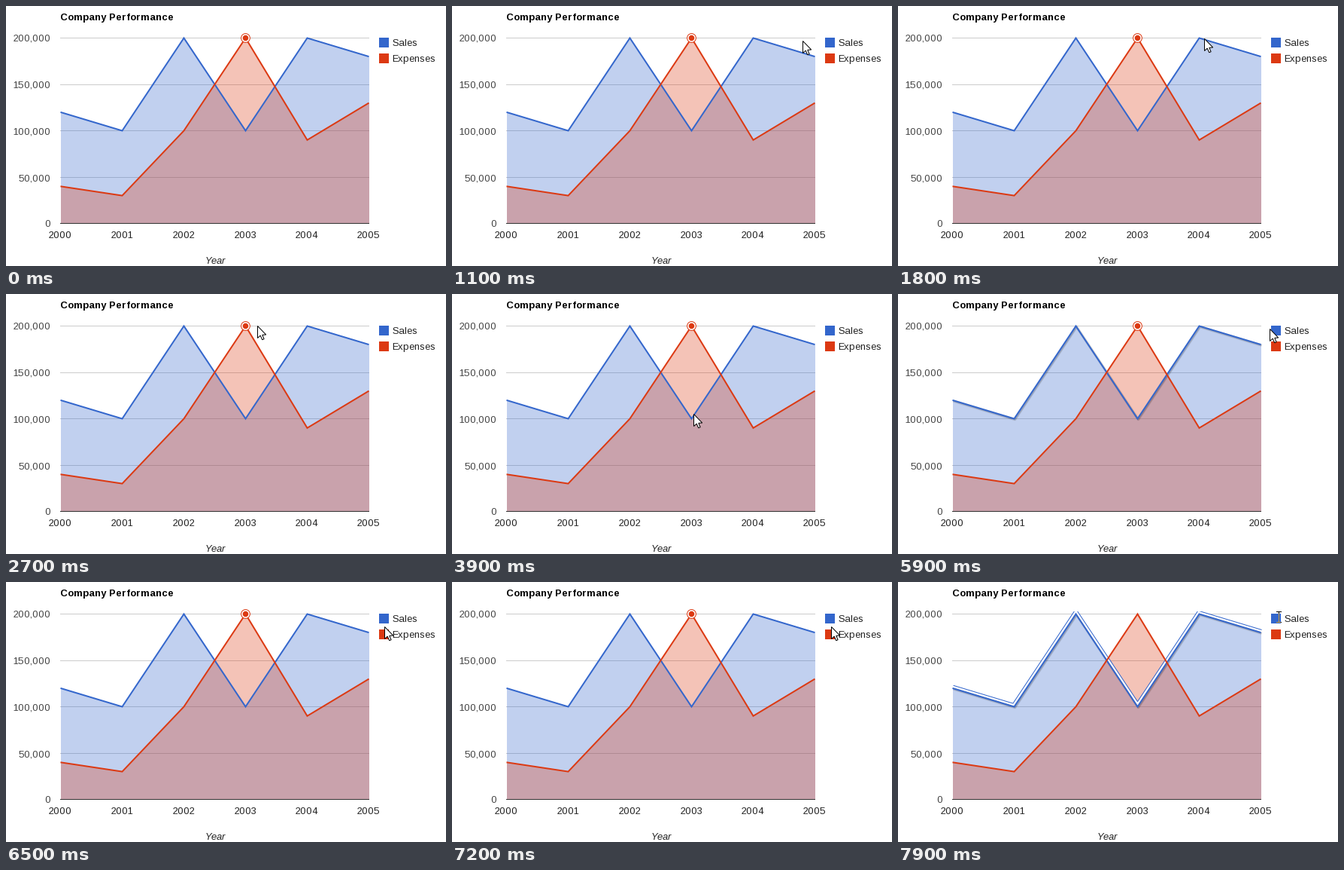
These frames come from a looping animation (585x345 px, 8000 ms). A matplotlib script:

```python
import numpy as np
import matplotlib.pyplot as plt
from matplotlib.animation import FuncAnimation
from matplotlib.patches import Circle, Polygon, Rectangle

# Whole-pixel hinting, as on a screen chart
plt.rcParams.update({"text.hinting_factor": 1, "text.kerning_factor": 6})

W, H, DPI = 585, 345, 72
STEP, FRAMES = 100, 80
LEFT, RIGHT, TOP, BASE = 72.5, 482.5, 42.5, 288.5
BLUE, RED = "#3366cc", "#dc3912"

SERIES = [
    # name, colour, values in thousands, tooltip width
    ("Sales", BLUE, [120, 100, 200, 100, 200, 180], 101),
    ("Expenses", RED, [40, 30, 100, 200, 90, 130], 126),
]

# Pointer moves: start and end in seconds, then where it stops
ENTRY = np.array([556, 54])
MOVES = [
    (0.5, 1.1, (466, 47)), (1.1, 1.5, (422, 46)), (1.6, 2.0, (402, 44)),
    (2.3, 2.7, (334, 43)), (2.7, 3.1, (319, 43)), (3.5, 3.9, (321, 160)),
    (3.9, 4.1, (319, 160)), (5.0, 5.3, (470, 52)), (5.3, 5.5, (561, 52)),
    (5.6, 5.9, (494, 47)), (5.9, 6.5, (503, 60)), (6.6, 6.9, (503, 73)),
    (7.0, 7.2, (504, 60)), (7.2, 7.6, (506, 46)),
]
ENTER, CLICK = 0.5, 7.9
HIT = 5.8

fig = plt.figure(figsize=(W / DPI, H / DPI), dpi=DPI, facecolor="white")
ax = fig.add_axes([0, 0, 1, 1])
ax.set_xlim(0, W)
ax.set_ylim(H, 0)
ax.axis("off")
plot_clip = Rectangle((72, 39), 412, 251, transform=ax.transData)


def label(x, y, text, color="#222222", **kw):
    return ax.text(x, y, text, color=color, fontsize=13.3,
                   family="Liberation Sans", va="baseline", **kw)


def stroke(pts, color, width, z, join="miter", **kw):
    line, = ax.plot(*np.transpose(pts), color=color, lw=width, zorder=z,
                    solid_joinstyle=join, solid_capstyle="butt", snap=False,
                    **kw)
    return line


def raised(pts, d):
    """Parallel polyline at distance d above pts, with mitred corners."""
    seg = np.diff(pts, axis=0)
    n = np.column_stack([seg[:, 1], -seg[:, 0]])
    n /= np.hypot(n[:, 0], n[:, 1])[:, None]
    a, b = np.vstack([n[:1], n]), np.vstack([n, n[-1:]])
    return pts + d * (a + b) / (1 + (a * b).sum(axis=1))[:, None]


def disc(center, r, z, **kw):
    return ax.add_patch(Circle(center, r, zorder=z, **kw))


def show(artists, on):
    for artist in artists:
        artist.set_visible(bool(on))


# Grid, axis and labels
for k in range(5):
    y = np.floor(BASE - k * (BASE - TOP) / 4)
    color, z = ("#cccccc", 1) if k else ("#333333", 6)
    stroke([(72, y + 0.5), (483, y + 0.5)], color, 1, z)
    label(59.3, y + 5, f"{k * 50000:,}", "#444444", ha="right")
xs = np.linspace(LEFT, RIGHT, 6)
for i, x in enumerate(xs):
    label(x, 308, str(2000 + i), ha="center")
label(72, 19, "Company Performance", "black", weight="bold")
label(278, 342, "Year", style="italic", ha="center")

# Series
points, shadows, swatches, outline = [], [], [], []
for i, (name, color, values, _) in enumerate(SERIES):
    pts = np.column_stack([xs, BASE - np.array(values) * (BASE - TOP) / 200])
    points.append(pts)
    ax.fill_between(xs, pts[:, 1], BASE, color=color, alpha=0.3, lw=0,
                    zorder=2 + i * 0.1)
    z = 4 + i * 0.5
    stroke(pts, color, 2, z + 0.3).set_clip_path(plot_clip)
    shadows.append([stroke(pts + 1, "black", w, z, "round", alpha=0.12)
                    for w in (2, 3.5)])
    row = 42 + 21 * i
    swatches.append(ax.add_patch(
        Rectangle((496, row), 13, 13, fc=color, lw=0, zorder=3)))
    label(513.5, row + 11, name)

for d, color, width in ((2.2, "white", 2.6), (3.8, BLUE, 1)):
    line = stroke(raised(points[0], d), color, width, 4.2)
    line.set_clip_path(plot_clip)
    outline.append(line)

# Selected point and hover marks
peak = points[1][3]
ring = [disc(peak, 5.9, 7, fc="white", ec=RED, lw=1),
        disc(peak, 3.8, 7.1, fc=RED, lw=0)]
peak_glow = disc(peak, 7.5, 6.9, fc="none", ec=RED, lw=2, alpha=0.3)
dot = disc((0, 0), 4, 7, fc=BLUE, lw=0)
dot_glow = disc((0, 0), 5.2, 7, fc="none", ec=BLUE, lw=2.4, alpha=0.3)

# Tooltip
tip_shade = ax.add_patch(Polygon(np.eye(3, 2), fc="black", lw=0, alpha=0.12,
                                 zorder=8))
tip_box = ax.add_patch(Polygon(np.eye(3, 2), fc="white", ec="#cccccc", lw=1,
                               zorder=8.1))
tip_text = label(0, 0, "", "black", weight="bold", ha="center", zorder=8.2)
tooltip = [tip_shade, tip_box, tip_text]

# Pointers; the text pointer inverts the blue square below it
ARROW = np.array([(0, 0), (0, 16), (3.7, 12.6), (6.2, 18.2), (8.6, 17.2),
                  (6.3, 11.8), (11.2, 11.5)]) + (0.5, -0.5)
GAP = (np.nan, np.nan)
BEAM = np.array([(-3, -7), (4, -7), GAP, (0.5, -7), (0.5, 7), GAP,
                 (-3, 7), (4, 7)])
arrow = ax.add_patch(Polygon(ARROW, fc="white", ec="black", lw=1, zorder=10))
beam = [stroke(BEAM, "black", 1, 10), stroke(BEAM, "#cc9933", 1, 10.1)]
beam[1].set_clip_path(swatches[0])


def place_tooltip(series, p):
    name, _, values, width = SERIES[series]
    value = values[int(np.argmin(abs(xs - p[0])))] * 1000
    mid, top = p[0] + 18, p[1] - 42
    l, r, b = mid - width / 2 + 0.5, mid + width / 2 - 0.5, top + 27
    shape = np.array([(l, top), (r, top), (r, b), (mid + 15, b),
                      p + (4, -4), (mid, b), (l, b)])
    tip_box.set_xy(shape)
    tip_shade.set_xy(shape + 1.2)
    tip_text.set_position((mid, top + 17))
    tip_text.set_text(f"{name}: {value}")


def pointer(t):
    pos = ENTRY
    for start, end, stop in MOVES:
        u = np.clip((t - start) / (end - start), 0, 1)
        pos = pos + (np.array(stop) - pos) * u * (2 - u)
    return np.round(pos)


def legend_row(x, y):
    if 492 <= x <= 550:
        for row in range(2):
            if abs(y - 48.5 - 21 * row) <= 8:
                return row
    return None


def point_at(pos):
    for s, pts in enumerate(points):
        for p in pts:
            if np.hypot(*(p - pos)) < HIT:
                return s, p
    return None


def draw(frame):
    t = frame * STEP / 1000
    inside, clicked = t >= ENTER, t >= CLICK
    pos = pointer(t)
    row = legend_row(*pos) if inside else None
    near = point_at(pos) if inside else None

    for s in range(2):
        show(shadows[s], row == s)
    show(outline, clicked)
    show(ring, not clicked)

    on_peak = near is not None and near[0] == 1
    show([peak_glow], on_peak or row == 1)
    show([dot, dot_glow], near is not None and not on_peak)
    show(tooltip, near is not None)
    if near is not None:
        dot.center = dot_glow.center = tuple(near[1])
        place_tooltip(*near)

    text_mode = row is not None and pos[0] >= 506
    show([arrow], inside and not text_mode)
    show(beam, inside and text_mode)
    arrow.set_xy(ARROW + pos)
    for line in beam:
        line.set_data(*(BEAM + pos + (0, 0.5)).T)
    return []


anim = FuncAnimation(fig, draw, frames=FRAMES, interval=STEP, repeat=True,
                     repeat_delay=0, blit=False)
plt.show()
```
